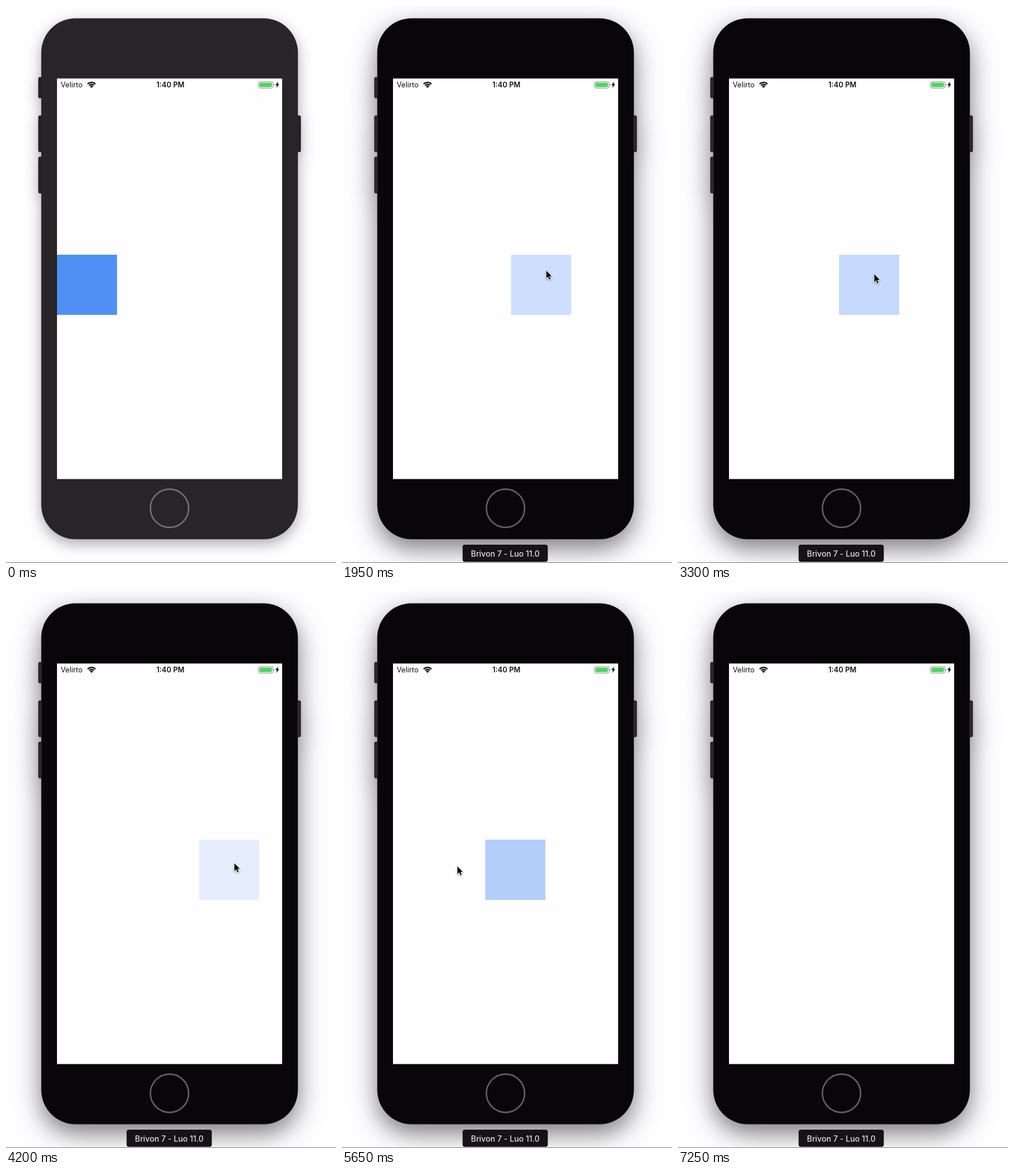
An HTML page with a canvas for the animation above (7.35 s loop, 576x972 px).

```html
<!DOCTYPE html>
<html lang="en">
<head>
<meta charset="utf-8">
<title>Drag to fade</title>
<style>
  html, body { margin: 0; width: 100%; height: 100%; overflow: hidden; background: #fefdff; }
  canvas { display: block; width: 576px; height: 972px; }
</style>
</head>
<body>
<canvas id="stage" width="576" height="972"></canvas>
<script>
const ctx = document.getElementById('stage').getContext('2d');
const LOOP = 7350, STEP = 50;
const ARRIVE = 850, PRESS = 1250, RELEASE = 4885, LEAVE = 7000, GONE = 7250;
const LEFT = 89, TRAVEL = 288, SIZE = 104.8;
const SPEED = TRAVEL / 2000;   // the full fade takes two seconds
const GRIP = 61;               // pointer offset inside the dragged square
const HOME = { x: 135, y: 471 }, REST = { x: 201, y: 479 };
const PAPER = '#fefdff', GREY = '#8f8e90';
const FONT = 'Inter, Roboto, sans-serif';

// turning points of the drag: time, pointer x
const TURNS = [
  [PRESS, HOME.x], [2050, 365], [2910, 165], [3340, 346],
  [3700, 272], [4270, 403], [RELEASE, REST.x]
];
const ARROW = new Path2D('M0 0V15.6L3.5 12.3L6 18L8.5 17L6.1 11.3L10.9 11.2Z');

const clamp = (v, lo, hi) => Math.min(hi, Math.max(lo, v));
const mix = (a, b, k) => a + (b - a) * k;
const ease = u => (1 - Math.cos(Math.PI * u)) / 2;

function dragAt(t) {
  const i = TURNS.findIndex(turn => turn[0] > t);
  const [t0, x0] = TURNS[i - 1], [t1, x1] = TURNS[i];
  const u = (t - PRESS) / (RELEASE - PRESS);
  return {
    x: mix(x0, x1, ease((t - t0) / (t1 - t0))),
    y: mix(HOME.y, REST.y, u) - 12.5 * Math.sin(Math.PI * Math.sqrt(u))
  };
}

function pointerAt(t) {
  if (t < PRESS) {
    const away = (1 - Math.min(1, t / ARRIVE)) ** 2;
    return { x: HOME.x - 141 * away, y: HOME.y + 29 * away };
  }
  if (t < RELEASE) return dragAt(t);
  const out = ease(clamp((t - LEAVE) / (GONE - LEAVE), 0, 1));
  return { x: REST.x - 220 * out, y: REST.y + 21 * out };
}

// distance the square has moved from the left edge
function shiftAt(t) {
  if (t < PRESS) return 0;
  const x = t < RELEASE ? dragAt(t).x : REST.x + (t - RELEASE) * SPEED;
  return clamp(x - GRIP - LEFT, 0, TRAVEL);
}

function box(x, y, w, h, r, fill) {
  ctx.beginPath();
  ctx.roundRect(x, y, w, h, r);
  ctx.fillStyle = fill;
  ctx.fill();
}

function text(str, x, y, font, fill, align = 'left') {
  ctx.font = `${font} ${FONT}`;
  ctx.textAlign = align;
  ctx.fillStyle = fill;
  ctx.fillText(str, x, y);
}

function shadow(color, blur, dy) {
  ctx.shadowColor = color;
  ctx.shadowBlur = blur;
  ctx.shadowOffsetY = dy;
}

function sideKeys() {
  ctx.roundRect(56.5, 124, 6, 37, [3, 0, 0, 3]);
  ctx.roundRect(56.5, 191, 6, 64, [3, 0, 0, 3]);
  ctx.roundRect(56.5, 263, 6, 64, [3, 0, 0, 3]);
  ctx.roundRect(508.5, 191, 6, 64, [0, 3, 3, 0]);
}

function drawPhone(active) {
  ctx.save();
  if (active) shadow('rgba(0,0,0,0.52)', 44, 16);
  else shadow('rgba(0,0,0,0.34)', 24, 8);
  ctx.beginPath();
  ctx.roundRect(61.5, 21.5, 448, 909, 60);
  sideKeys();
  ctx.fillStyle = active ? '#080609' : '#272528';
  ctx.fill();
  ctx.restore();

  ctx.beginPath();
  sideKeys();
  ctx.fillStyle = active ? '#29282a' : '#242225';
  ctx.fill();

  ctx.beginPath();
  ctx.arc(285.4, 876.5, 33.4, 0, Math.PI * 2);
  ctx.lineWidth = 2.6;
  ctx.strokeStyle = active ? '#626163' : '#737174';
  ctx.stroke();

  box(LEFT, 126.5, 393, 699, 0, PAPER);
}

function drawWifi(x, y) {
  const a = -Math.PI * 0.75, b = -Math.PI * 0.25;
  ctx.strokeStyle = ctx.fillStyle = '#080808';
  ctx.lineWidth = 2.3;
  for (const r of [9.6, 6]) {
    ctx.beginPath();
    ctx.arc(x, y, r, a, b);
    ctx.stroke();
  }
  ctx.beginPath();
  ctx.moveTo(x, y);
  ctx.arc(x, y, 3.8, a, b);
  ctx.fill();
}

function drawBattery() {
  ctx.beginPath();
  ctx.roundRect(440.5, 132, 25.5, 11.3, 2.6);
  ctx.lineWidth = 1;
  ctx.strokeStyle = GREY;
  ctx.stroke();
  box(442.3, 133.8, 21.8, 7.7, 1, '#50d266');
  box(466.8, 136, 1.4, 3.6, [0, 1, 1, 0], GREY);
}

// a bolt is one spike and its half-turn copy
function drawBolt(x, y) {
  ctx.save();
  ctx.translate(x, y);
  ctx.fillStyle = '#0a0a0a';
  for (let i = 0; i < 2; i++) {
    ctx.beginPath();
    ctx.moveTo(1.5, -5.4);
    ctx.lineTo(-3.3, 0.8);
    ctx.lineTo(0.6, 0.8);
    ctx.fill();
    ctx.rotate(Math.PI);
  }
  ctx.restore();
}

function drawStatus() {
  text('Velirto', 95.5, 142, '400 12.6px', '#111');
  text('1:40 PM', 287, 142, '600 12.6px', '#111', 'center');
  drawWifi(149.3, 142.9);
  drawBattery();
  drawBolt(473.5, 137.3);
}

function drawLabel(alpha) {
  ctx.save();
  ctx.globalAlpha = alpha;
  box(210.5, 940, 148.7, 30, 4, '#151316');
  text('Brivon 7 - Luo 11.0', 285, 961, '500 13.8px', '#e2e0e3', 'center');
  ctx.restore();
}

function drawPointer({ x, y }) {
  ctx.save();
  ctx.translate(x + 0.4, y + 1.4);
  ctx.scale(0.87, 0.87);
  ctx.save();
  shadow('rgba(0,0,0,0.35)', 3, 1.5);
  ctx.lineWidth = 2;
  ctx.lineJoin = 'round';
  ctx.strokeStyle = '#fff';
  ctx.stroke(ARROW);
  ctx.restore();
  ctx.fillStyle = '#050505';
  ctx.fill(ARROW);
  ctx.restore();
}

function draw(t) {
  const shift = shiftAt(t);
  ctx.fillStyle = PAPER;
  ctx.fillRect(0, 0, 576, 972);
  drawPhone(t >= PRESS);
  drawStatus();

  ctx.globalAlpha = 1 - shift / TRAVEL;
  box(LEFT + shift, 434.1, SIZE, SIZE, 0, '#5090f4');
  ctx.globalAlpha = 1;

  ctx.fillStyle = '#777678';
  ctx.fillRect(0, 971, 576, 1);
  drawLabel(clamp((t - 350) / 300, 0, 1));
  if (t >= STEP && t < GONE) drawPointer(pointerAt(t));
}

const start = performance.now();
function tick() {
  const t = (performance.now() - start) % LOOP;
  draw(Math.min(GONE, Math.floor(t / STEP) * STEP));
  requestAnimationFrame(tick);
}
tick();
</script>
</body>
</html>
```
